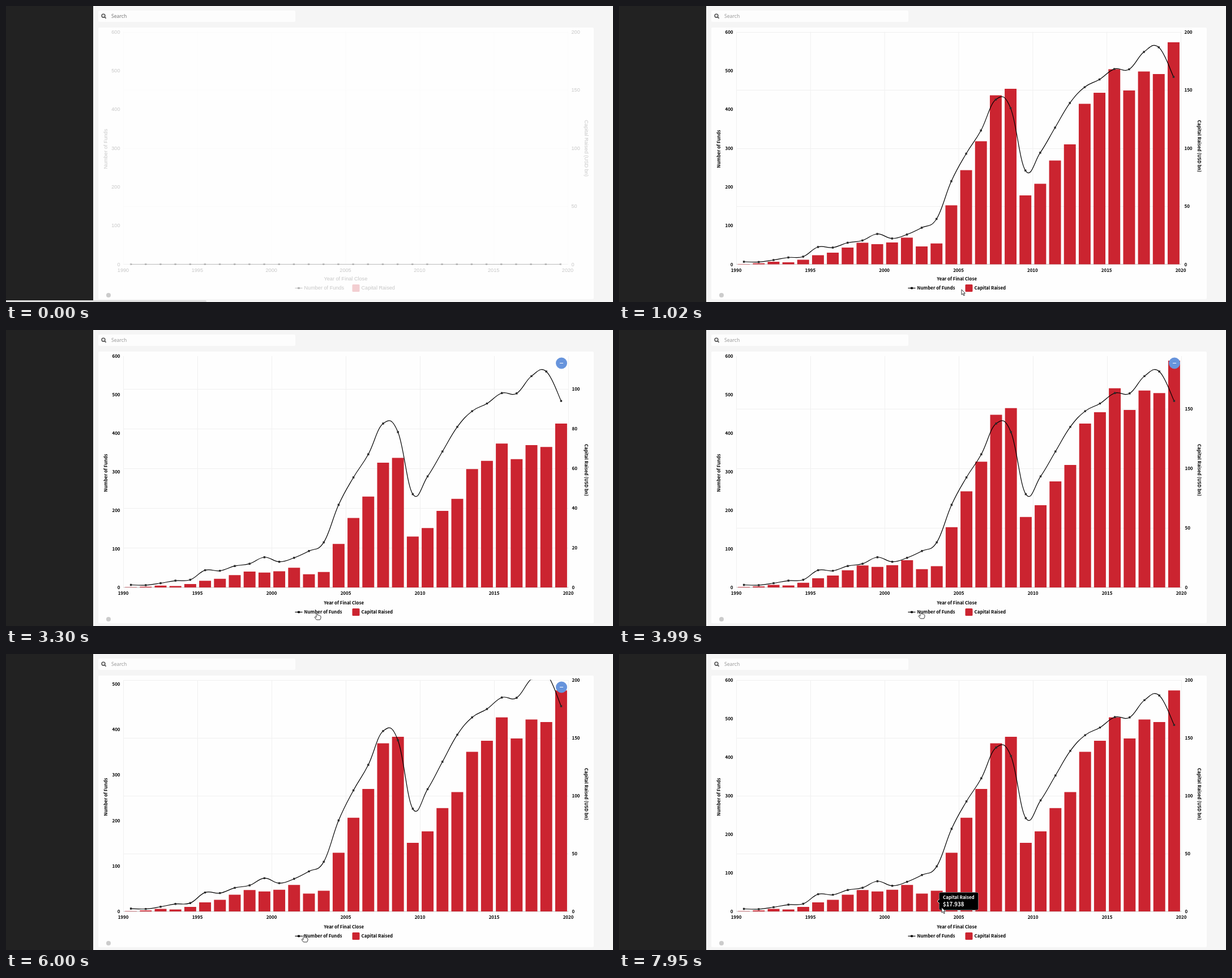
These frames come from a looping animation (1072 px wide and 522 px high, 8000 ms). An HTML page with a canvas:

```html
<!DOCTYPE html>
<html lang="en">
<head>
<meta charset="utf-8">
<title>Funds and capital raised</title>
<style>
html, body { margin: 0; width: 100%; height: 100%; overflow: hidden; background: #f5f5f5; }
canvas { display: block; }
</style>
</head>
<body>
<canvas id="stage" width="1072" height="522"></canvas>
<script>
const ctx = document.getElementById('stage').getContext('2d');
const LOOP = 8000;
const RED = '#cb2430';
const SANS = '"Noto Sans CJK SC", "Noto Sans CJK JP", "Noto Sans CJK", sans-serif';
const BOLD = `bold 7.95px ${SANS}`;
const FALLBACK = '9.13px "Liberation Sans", sans-serif';

// One value per year, 1990 to 2019
const capital = [0.3, 0.8, 2.2, 1.7, 3.9, 7.8, 10, 14.4, 18.5, 17.3, 18.8, 22.9, 15.4, 17.938, 50.7,
  81, 105.9, 145.4, 151, 59.3, 69.3, 89.3, 103.2, 138, 147.6, 167.8, 149.5, 165.9, 163.7, 191];
const funds = [6.6, 5.9, 11, 17.6, 19.8, 44.6, 43.2, 55.6, 61.5, 78.3, 66.6, 76.8, 94.4, 117, 214.4,
  285.3, 345.3, 425, 403, 242, 288, 352.6, 416.3, 457.2, 477, 504, 503.3, 548, 560, 483.6];

// Times at which the legend toggles a series
const BARS_HIDE = 1700, BARS_SHOW = 3129, LINE_HIDE = 4200, LINE_SHOW = 5408;

// Pointer path: time, x, y
const pointerPath = [[930, 600, 501], [1020, 605, 500], [1410, 621, 496], [2520, 621, 496],
  [2600, 622, 497], [2830, 618, 491], [2990, 618, 491], [3300, 549, 498], [3800, 549, 498],
  [4100, 526, 495], [6700, 526, 495], [7160, 560, 456], [7330, 562, 454], [7800, 570, 449], [7950, 570, 447]];

const clamp = (v) => Math.max(0, Math.min(1, v));
const progress = (t, start, length) => clamp((t - start) / length);
const cubicOut = (u) => 1 - (1 - u) ** 3;
const smooth = (u) => u * u * (3 - 2 * u);

// How much of a series is grown, given its intro, hide and show times
function grown(t, hide, hideLength, show) {
  if (t < hide) return cubicOut(progress(t, 70, 900));
  if (t < show) return 1 - cubicOut(progress(t, hide, hideLength));
  return cubicOut(progress(t, show, 1000));
}

// The axis dips towards the regrowing data, then chases it back to full range
function axisRange(t, show) {
  const s = (t - show) / 1000;
  if (s <= 0 || s >= 1.05) return 1;
  if (s < 0.22) return 1 - 0.475 * smooth(s / 0.22);
  return 1 - 0.475 * (1 - (s - 0.22) / 0.83) ** 1.9;
}

function tickStep(max) {
  const raw = max / 6, unit = 10 ** Math.floor(Math.log10(raw) + 1e-9);
  return unit * [1, 2, 5, 10].find((n) => n * unit >= raw - 1e-6);
}

function text(str, x, y, { align = 'left', font, color = '#000', turn = 0 }) {
  ctx.save();
  ctx.translate(x, y);
  ctx.rotate(turn * Math.PI / 2);
  ctx.font = font;
  ctx.fillStyle = color;
  ctx.textAlign = align;
  ctx.fillText(str, 0, 3.1);
  ctx.restore();
}

function box(x, y, w, h, r, color) {
  ctx.fillStyle = color;
  ctx.beginPath();
  ctx.roundRect(x, y, w, h, r);
  ctx.fill();
}

function disc(x, y, r, color) {
  ctx.fillStyle = color;
  ctx.beginPath();
  ctx.arc(x, y, r, 0, 7);
  ctx.fill();
}

function segment(x1, y1, x2, y2, color, width = 1) {
  ctx.strokeStyle = color;
  ctx.lineWidth = width;
  ctx.beginPath();
  ctx.moveTo(x1, y1);
  ctx.lineTo(x2, y2);
  ctx.stroke();
}

function drawPage(t) {
  box(0, 0, 1072, 522, 0, '#f5f5f5');
  box(0, 0, 154, 522, 0, '#222');
  box(163, 8, 348, 20, 2, '#fdfdfd');
  box(163, 38, 875, 479, 2, '#fefefe');
  ctx.strokeStyle = '#555';
  ctx.lineWidth = 1.6;
  ctx.beginPath();
  ctx.arc(172, 17.2, 2.9, 0, 7);
  ctx.stroke();
  segment(174.2, 19.4, 176.6, 21.8, '#555', 1.8);
  text('Search', 186, 18, { font: '8.6px "Noto Sans", sans-serif', color: t < 70 ? '#777' : '#999' });
  disc(181, 510, 4, '#ccc');
}

function drawLine(pts, markers) {
  const n = pts.length - 1, at = (i) => pts[Math.max(0, Math.min(n, i))];
  ctx.strokeStyle = '#000';
  ctx.lineWidth = 1.2;
  ctx.beginPath();
  ctx.moveTo(...pts[0]);
  for (let i = 0; i < n; i++) {
    const [a, b, c, d] = [at(i - 1), at(i), at(i + 1), at(i + 2)];
    ctx.bezierCurveTo(b[0] + (c[0] - a[0]) * 0.2, b[1] + (c[1] - a[1]) * 0.2,
      c[0] + (b[0] - d[0]) * 0.2, c[1] + (b[1] - d[1]) * 0.2, c[0], c[1]);
  }
  ctx.stroke();
  if (markers) for (const [x, y] of pts) box(x - 1.7, y - 1.7, 3.4, 3.4, 0, '#2b2b2b');
}

function drawChart(t) {
  const late = t >= BARS_SHOW;
  const left = 207.5, right = late ? 993.5 : 992.5;
  const top = late ? 46 : 45.5, bottom = late ? 454 : 455.5;
  const font = t < 930 ? FALLBACK : BOLD;
  const slot = (right - left) / 30, height = bottom - top;
  const rangeL = axisRange(t, LINE_SHOW), rangeR = axisRange(t, BARS_SHOW);
  const maxL = 600 * rangeL, maxR = 200 * rangeR;
  const yL = (v) => bottom - v / maxL * height;
  const yR = (v) => bottom - v / maxR * height;
  const barsGrown = grown(t, BARS_HIDE, 800, BARS_SHOW);
  const lineGrown = grown(t, LINE_HIDE, 910, LINE_SHOW);

  ctx.save();
  ctx.globalAlpha = 0.22 + 0.78 * progress(t, 70, 400);

  for (let i = 0; i <= 6; i++) {
    const x = left + i * 5 * slot;
    segment(x, top, x, bottom, '#f0f0f0');
    text(1990 + i * 5, x - 0.5, bottom + 10.2, { align: 'center', font });
  }
  for (let v = 0, step = tickStep(maxR); v <= maxR + 0.01; v += step) {
    const y = Math.round(yR(v)) + 0.5;
    if (v) segment(left, y, right, y, '#f0f0f0');
    text(v, right + 6, yR(v), { font });
  }
  for (let v = 0, step = tickStep(maxL); v <= maxL + 0.01; v += step)
    text(v, 201.5, yL(v), { align: 'right', font });
  segment(left, bottom, right, bottom, '#c4c4c4');

  ctx.save();
  ctx.beginPath();
  ctx.rect(left, top - 0.5, right - left, height + 2);
  ctx.clip();
  const center = (i) => left + (i + 0.5) * slot;
  if (barsGrown > 0.001) capital.forEach((v, i) => {
    const y = yR(v * barsGrown);
    box(center(i) - slot * 0.4, y, slot * 0.8, bottom - y, 0, RED);
  });
  if (lineGrown > 0.001 || t < 1000)
    drawLine(funds.map((v, i) => [center(i), yL(v * lineGrown)]), t < LINE_HIDE || t >= LINE_SHOW);
  ctx.restore();

  text('Number of Funds', 175.5, 252, { align: 'center', font, turn: -1 });
  text('Capital Raised (USD bn)', 1025, 201, { font, turn: 1 });
  text('Year of Final Close', 561.5, 480.7, { font });

  const lineInk = t >= LINE_HIDE && t < 5370 ? '#999' : '#000';
  const barsOff = t >= BARS_HIDE && t < 2990;
  segment(510.5, 497.5, 523.5, 497.5, lineInk, 1.2);
  box(515.2, 495.7, 3.6, 3.6, 0, lineInk);
  text('Number of Funds', 526.5, 497, { font, color: lineInk });
  box(611.5, 491, 13, 13, 1.5, barsOff ? '#999' : RED);
  text('Capital Raised', 627.5, 497, { font, color: barsOff ? '#999' : '#000' });

  if (rangeL < 0.999 || rangeR < 0.999) {
    disc(981, 58.5, 10, '#6794dc');
    segment(978, 58.5, 984, 58.5, '#fff');
  }
  ctx.restore();
}

function drawTooltip(t) {
  ctx.save();
  ctx.globalAlpha = progress(t, 7300, 300);
  ctx.fillStyle = '#000';
  ctx.strokeStyle = '#ddd';
  ctx.lineWidth = 1;
  ctx.beginPath();
  ctx.roundRect(565.5, 420.5, 69, 31, 3);
  ctx.stroke();
  ctx.fill();
  ctx.beginPath();
  ctx.moveTo(566, 432);
  ctx.lineTo(562, 436);
  ctx.lineTo(566, 440);
  ctx.fill();
  ctx.stroke();
  box(566, 421, 68, 30, 3, '#000');
  text('Capital Raised', 572, 429.3, { font: BOLD, color: '#fff' });
  text('$17.938', 572, 442.3, { font: `bold 9.7px ${SANS}`, color: '#fff' });
  ctx.restore();
}

function drawPointer(t) {
  if (t < pointerPath[0][0]) return;
  const next = pointerPath.findIndex((p) => p[0] > t);
  const b = pointerPath.at(next), a = next < 0 ? b : pointerPath[next - 1];
  const u = a === b ? 0 : smooth(progress(t, a[0], b[0] - a[0]));
  const hand = t > 1200 && t < 6790;
  const shape = new Path2D(hand
    ? 'M-1 8V1.5Q0-.5 1.2 1.5V5Q2.6 4 3.5 5.5Q5 4.8 5.6 6Q7 5.8 7 7.5V10L5.6 13H-.6L-4 8.6Q-3.6 6.6-1 8.6Z'
    : 'M0 0V9.2L2.2 7.3L3.8 10.8L5.3 10.1L3.7 6.7H6.4Z');
  ctx.save();
  ctx.translate(a[1] + (b[1] - a[1]) * u, a[2] + (b[2] - a[2]) * u);
  ctx.fillStyle = '#fff';
  ctx.strokeStyle = '#222';
  ctx.lineWidth = 0.9;
  ctx.fill(shape);
  ctx.stroke(shape);
  ctx.restore();
}

function frame() {
  const t = performance.now() % LOOP;
  drawPage(t);
  drawChart(t);
  if (t < 450) box(0, 519, 354, 3, [0, 2, 0, 0], '#dcdcdc');
  drawTooltip(t);
  drawPointer(t);
  requestAnimationFrame(frame);
}
frame();
</script>
</body>
</html>
```
